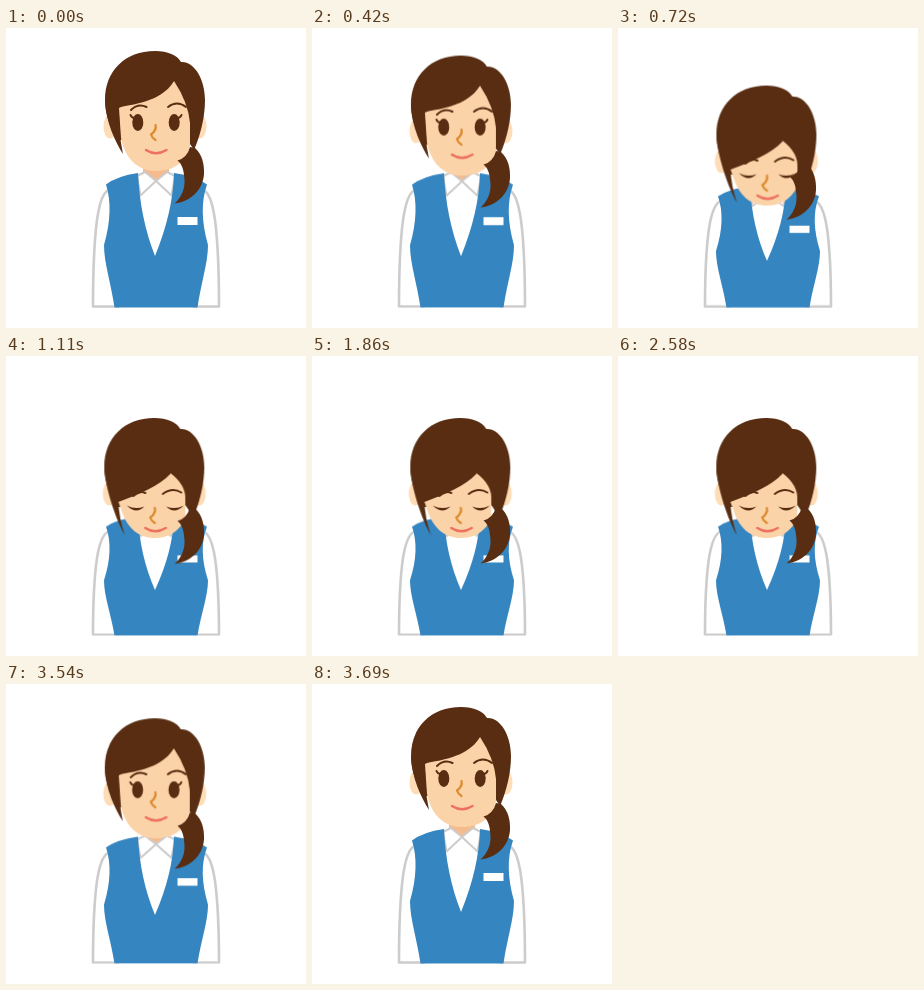
Recreate the animation shown at these times as an HTML page without scripts. Size 300 px wide and 300 px high, loop 4.5 s.

```html
<!DOCTYPE html>
<html lang="en">
<head>
<meta charset="utf-8">
<title>Bowing clerk</title>
<style>
  html, body { margin: 0; width: 100%; height: 100%; overflow: hidden; background: #fff; }
  svg { display: block; width: 100vw; height: 100vh; }

  .hair { fill: #582d12; }
  .skin { fill: #fbd3a8; }
  .ear { fill: #fedcb5; }
  .vest { fill: #3585c0; }
  .shirt { fill: #fff; stroke: #ccc; stroke-width: 2.6; stroke-linejoin: round; }
  .collar { stroke-width: 2; }
  .line { fill: none; stroke: #582d12; stroke-width: 2; stroke-linecap: round; }
  .nose { stroke: #dc8a2c; stroke-width: 2.2; stroke-linejoin: round; }
  .mouth { stroke: #ee705e; stroke-width: 2.4; }

  .body, .head, .tail, .up, .down { animation: 4.5s linear infinite; }
  .body { animation-name: squash; transform-origin: 150px 279px; }
  .head { animation-name: bow; }
  .tail { animation-name: swing; }
  .up { animation-name: look-up; animation-timing-function: step-end; }
  .down { animation-name: look-down; animation-timing-function: step-end; }

  @keyframes bow {
    0%, 6.667% { transform: none; animation-timing-function: cubic-bezier(.37, 0, .63, 1); }
    18.667% { transform: translate(-.7px, 39px); }
    73.333% { transform: translate(-.7px, 39px); animation-timing-function: cubic-bezier(.4, 0, .57, 1); }
    82%, 100% { transform: none; }
  }
  /* The shoulders start a little after the head. */
  @keyframes squash {
    0%, 8.667% { transform: none; animation-timing-function: cubic-bezier(.37, 0, .63, 1); }
    18.667% { transform: scaleY(.885); }
    75.333% { transform: scaleY(.885); animation-timing-function: cubic-bezier(.37, 0, .63, 1); }
    82%, 100% { transform: none; }
  }
  /* The ponytail lags behind the head, then settles. */
  @keyframes swing {
    0%, 6.667% { transform: none; animation-timing-function: ease-in; }
    9.333% { transform: translateY(4px); }
    16% { transform: translateY(16px); }
    18.667% { transform: translateY(26px); animation-timing-function: ease-out; }
    22.667% { transform: translateY(32.5px); animation-timing-function: ease-in-out; }
    30.667% { transform: translateY(32px); }
    73.333% { transform: translateY(32px); animation-timing-function: cubic-bezier(.4, 0, .57, 1); }
    82%, 100% { transform: none; }
  }
  @keyframes look-up {
    0%, 77.667% { visibility: visible; }
    12.667% { visibility: hidden; }
  }
  @keyframes look-down {
    0%, 77.667% { visibility: hidden; }
    12.667% { visibility: visible; }
  }
</style>
</head>
<body>
<svg viewBox="0 0 300 300">
  <defs>
    <path id="sleeve" class="shirt" d="M103 162C96 164 93 178 91 192C88 215 87 240 87 278.500H112V162Z"/>
    <path id="flap" class="shirt collar" d="M139 144L150 153L134.500 167.500L131 148Z"/>
    <ellipse id="ear" class="ear" cx="104" cy="98.500" rx="6.500" ry="12"/>
    <g id="eye">
      <ellipse class="hair" cx="131.800" cy="94.500" rx="5.500" ry="8.500"/>
      <path class="line" d="M124.500 87Q125.500 90 129 90"/>
    </g>
    <path id="lid" class="hair" d="M121.500 110.500Q130 115 139 111.500Q131 120 121.500 110.500Z"/>
    <path id="nose" class="line nose" d="M149.500 97Q151 102 145 106.500Q146 110 149.500 112"/>
    <path id="mouth" class="line mouth" d="M140 122Q150 128.500 160.500 122"/>
  </defs>

  <g class="body">
    <use href="#sleeve"/>
    <use href="#sleeve" transform="matrix(-1 0 0 1 300 0)"/>
    <path fill="#fff" d="M130 145H170L164 200L149 232L136 200Z"/>
    <path fill="#f4bb8e" d="M137 136H163V144L150 153L137 144Z"/>
    <use href="#flap"/>
    <use href="#flap" transform="matrix(-1 0 0 1 300 0)"/>
    <path class="vest" d="M132 145Q111 148 100 156.500Q108 182 98 217C98 235 105 255 108.500 279.500H191.500C195 255 202 235 202 217Q192 182 201 156.500Q189 148 168 145Q167 184 149 228Q134 190 132 145Z"/>
    <rect x="171.500" y="189" width="20" height="8" fill="#fff"/>
  </g>

  <g class="head">
    <use href="#ear"/>
    <use href="#ear" x="90"/>
    <path class="hair" d="M99 72C99 43 119 23 149 23C162 23 171 27 175 34C188 33 199 51 199 72C199 88 195 106 188 122L180 110L112 112C104 100 99 86 99 72Z"/>

    <g class="up">
      <path class="skin" d="M113 80L168 53Q182 74 184 95V118C180 134 168 143 150 143C131 143 119 130 115 110Z"/>
      <path class="line" d="M125 82Q132 75 140.500 79M162 79Q171 72 180 79"/>
      <use href="#eye"/>
      <use href="#eye" transform="matrix(-1 0 0 1 300 0)"/>
      <use href="#nose"/>
      <use href="#mouth"/>
      <path class="hair" d="M99 72L110 60L168 50V53C159 68 142 75 113 79Q112 102 117 126C109 113 100 95 99 72Z"/>
    </g>

    <g class="down">
      <path class="skin" d="M112 104L165 78Q181 90 180 105V124C173 137 163 143 150 143C133 143 121 133 115 112Z"/>
      <path class="line" d="M128 101Q134 95 140 98M157.500 99Q167 92 176 97.500"/>
      <use href="#lid"/>
      <use href="#lid" transform="matrix(-1 0 0 1 300 0)"/>
      <use href="#nose" y="16"/>
      <use href="#mouth" y="11"/>
      <path class="hair" d="M99 74L120 65L165 74V79C154 91 134 99 113 107Q114 124 119.500 140C111 125 101 97 99 74Z"/>
    </g>
  </g>

  <path class="hair tail" d="M184 119L189 120C196 126 198.500 136 198 146C197 162 184 174 168.500 175.500C176 169 179 160 178.500 152C178 142 176 136 171.500 132.500Q181 130 184 119Z"/>
</svg>
</body>
</html>
```
